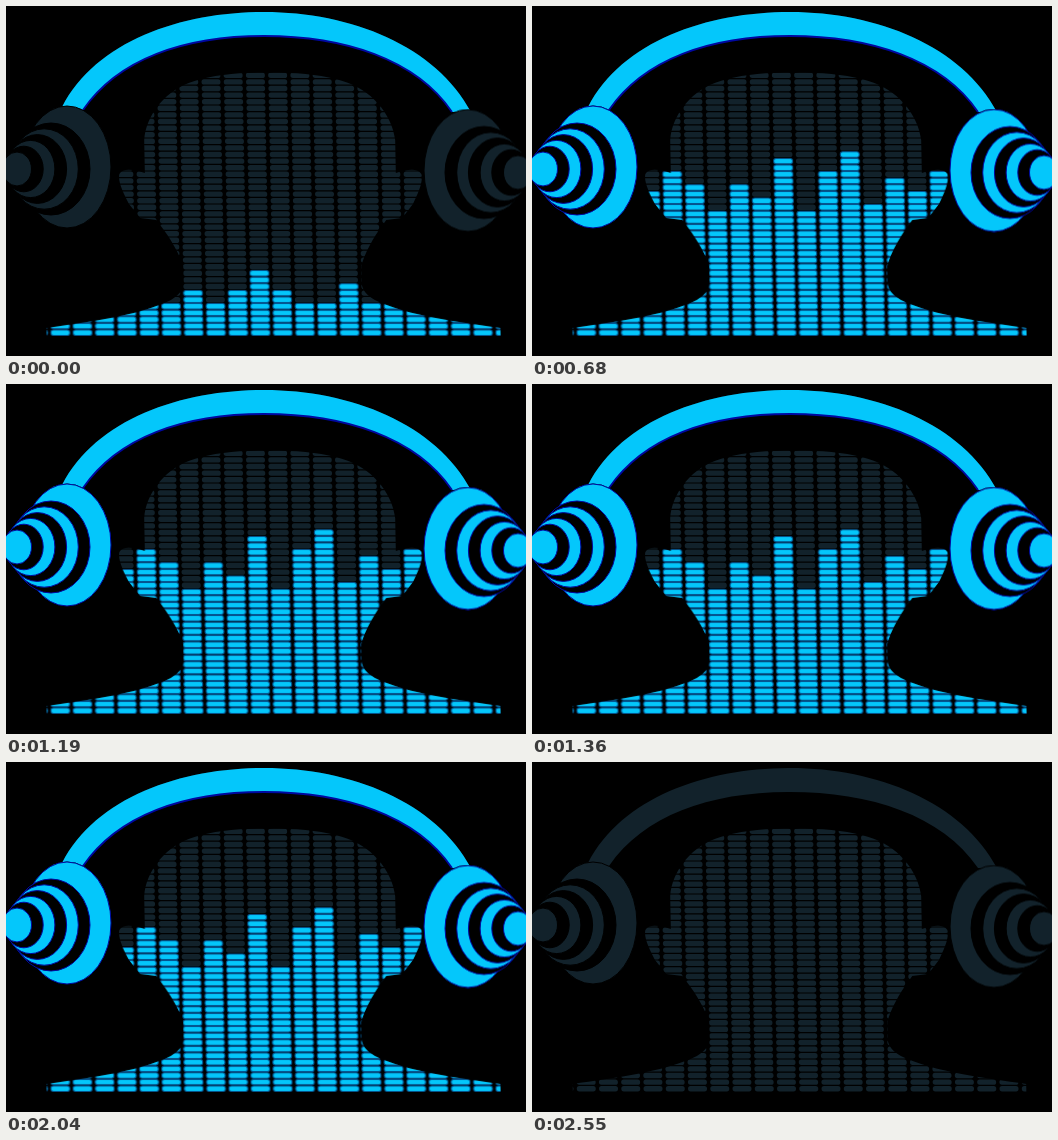
Write an HTML page that moves like this. It is 520 px wide and 350 px high and loops after 2890 ms.

```html
<!DOCTYPE html>
<html lang="en">
<head>
<meta charset="utf-8">
<title>Equalizer head with headphones</title>
<style>
  html, body { margin: 0; width: 100%; height: 100%; overflow: hidden; background: #000; }
  svg { display: block; width: 100vw; height: 100vh; }
  .low, .mid, .high { animation: 2890ms step-end infinite; }
  .low { animation-name: low; }
  .mid { animation-name: mid; }
  .high { animation-name: high; }
  /* steps of 170 ms: lit until 2550, 170 to 2380, 340 to 2210 */
  @keyframes low { 0% { opacity: 1; } 88.235%, 100% { opacity: 0; } }
  @keyframes mid { 0% { opacity: 0; } 5.882% { opacity: 1; } 82.353%, 100% { opacity: 0; } }
  @keyframes high { 0% { opacity: 0; } 11.765% { opacity: 1; } 76.471%, 100% { opacity: 0; } }
</style>
</head>
<body>
<svg id="stage" viewBox="0 0 520 350" preserveAspectRatio="none">
  <defs>
    <clipPath id="head"></clipPath>
  </defs>
</svg>
<script>
const stage = document.getElementById('stage');
const DARK = '#12222b', LIT = '#04c7fb', EDGE = '#0008a0', SEAM = '#04508c';

const RIM = 'M446 106C410 53 338 30 258 30C178 30 112 53 77 104';
const BAND = RIM + 'L56 101C90 35 175 6 258 6C345 6 430 40 465 106Z';

// Left half of the head, measured from its middle line
const HALF = 'M1 67C-30 66 -54 69 -74 75C-102 83 -123 108 -125.5 134V167C-135 164 -147 161 -151 168' +
  'C-153 176 -147 188 -142 198L-131 212L-115 214C-104 228 -94 244 -89 260V272' +
  'C-88 284 -94 289 -102 294C-135 310 -185 316 -227 322V330H1Z';
// The head leans slightly to the left
const LEAN = 'matrix(1 0 .02 1 261 0)';

const FIRST = -6;
const HEIGHTS = [22, 25, 23, 19, 23, 21, 27, 19, 25, 28, 20, 24, 22, 25];

const none = () => 0;
const all = () => 40;
// Three peaks, falling three rows per column
const low = k => Math.max(5, 7 - 3 * Math.abs(k + 3), 10 - 3 * Math.abs(k), 8 - 3 * Math.abs(k - 4));
const high = k => HEIGHTS[k - FIRST] ?? 5;
const mid = k => Math.round((low(k) + high(k)) / 2);

function add(parent, name, attrs = {}) {
  const el = document.createElementNS('http://www.w3.org/2000/svg', name);
  for (const key in attrs) el.setAttribute(key, attrs[key]);
  return parent.appendChild(el);
}

function cell(k, row) {
  const x = 22.25 * k - 20, y = 324 - 6.6 * row;
  return `M${x.toFixed(2)} ${y.toFixed(2)}h14q2.5 0 2.5 2.7t-2.5 2.7h-14q-2.5 0-2.5-2.7t2.5-2.7z`;
}

function bars(parent, from, to, fill, stroke = 'none') {
  let d = '';
  for (let k = -10; k <= 11; k++)
    for (let row = from(k); row < to(k); row++) d += cell(k, row);
  add(parent, 'path', { d, fill, stroke, 'clip-path': 'url(#head)', transform: LEAN });
}

function band(parent, fill, edge) {
  add(parent, 'path', { d: BAND, fill });
  if (edge) add(parent, 'path', { d: RIM, fill: 'none', stroke: edge, 'stroke-width': 1.8 });
}

// A cup, then gaps and rings that shrink evenly towards the core
function cup(parent, fill, stroke, transform) {
  const g = add(parent, 'g', { stroke, transform });
  add(g, 'ellipse', { cx: 61, cy: 161, rx: 44, ry: 61, fill });
  for (let i = 0; i < 6; i++)
    add(g, 'ellipse', {
      cx: 45 - 6.8 * i, cy: 163, rx: 39 - 4.9 * i, ry: 46 - 5.8 * i, fill: i % 2 ? fill : '#000'
    });
}

function cups(parent, fill, edge) {
  cup(parent, fill, edge, 'translate(0 0)');
  cup(parent, fill, edge, 'translate(523 3.5) scale(-1 1)');
}

const clip = document.getElementById('head');
add(clip, 'path', { d: HALF });
add(clip, 'path', { d: HALF, transform: 'scale(-1 1)' });

const base = add(stage, 'g');
band(base, DARK);
bars(base, none, all, DARK);

const lowLayer = add(stage, 'g', { class: 'low' });
band(lowLayer, LIT, EDGE);
bars(lowLayer, none, low, LIT, SEAM);

cups(add(stage, 'g'), DARK, '#000');

const midLayer = add(stage, 'g', { class: 'mid' });
cups(midLayer, LIT, EDGE);
bars(midLayer, low, mid, LIT, SEAM);

bars(add(stage, 'g', { class: 'high' }), mid, high, LIT, SEAM);
</script>
</body>
</html>
```
